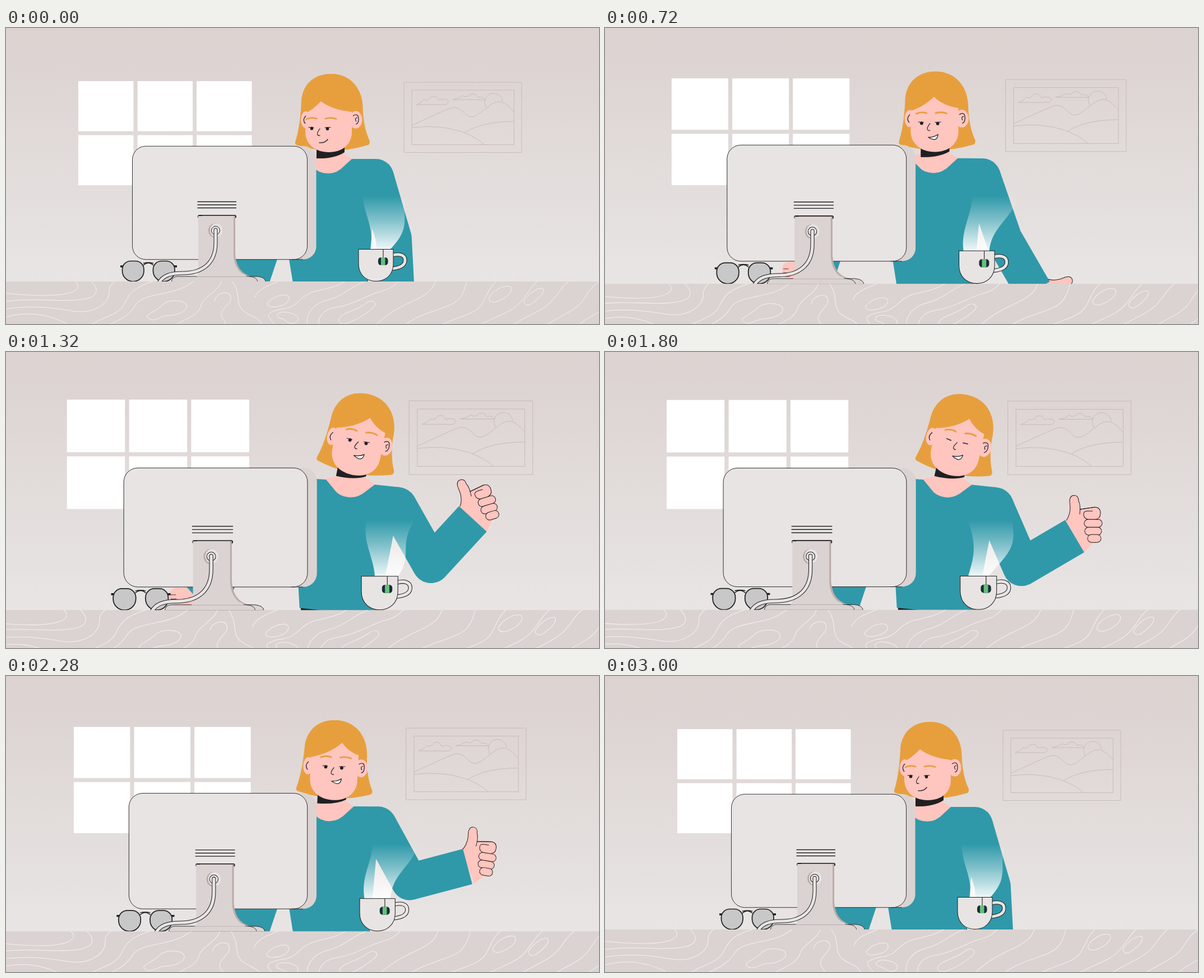
An HTML page with a canvas for the animation above (3060 ms loop, 1058x529 px).

```html
<!DOCTYPE html>
<html lang="en">
<head>
<meta charset="utf-8">
<title>Thumbs up at the desk</title>
<style>
html, body { margin: 0; height: 100%; overflow: hidden; background: #dcd3d1; }
canvas { display: block; width: 1058px; height: 529px; }
</style>
</head>
<body>
<canvas id="stage" width="1058" height="529"></canvas>
<script>
const ctx = document.getElementById('stage').getContext('2d');
const LOOP = 3060, STEP = 60, DEG = Math.PI / 180;
const INK = '#202022', HAIR = '#e79f3e', SKIN = '#ffc5bf', TEAL = '#2f99a9',
      PALE = '#e8e4e3', SAND = '#dbd3d1', SHADE = '#bbaca8';

// pose tracks, one value per time in KEYS
const KEYS = [0, 480, 960, 1320, 1800, 2280, 2900, 3060];
const TRACKS = {
  headX:  [0, 7.1, 10.2, 35.5, 34.8, 1.8, 0, 0],
  headY:  [0, .6, 1.5, 1.6, 2.3, 1.2, 0, 0],
  tilt:   [0, 0, 0, 11, 12, 3, 0, 0],
  turn:   [0, 0, 1, 1, 1, 1, 0, 0],
  bodyX:  [0, 7, 10, 12, 9, .5, 0, 0],
  lean:   [0, 0, 1.1, 6, 6, .3, 0, 0],
  upper:  [16.2, 16.2, 23.7, 29.5, 23.4, 28.7, 16.2, 16.2],
  fore:   [87, 87, 13.8, -47.4, -30.4, -14.9, 87, 87],
  hand:   [90, 90, 45, -17, 0, 9.5, 90, 90],
  sleeve: [484, 441, 413, 414, 469, 485, 484, 484],
  typing: [370, 350, 300, 303, 352, 368, 370, 370]
};

const slope = (v, i) => (v[i + 1] - v[i]) / (KEYS[i + 1] - KEYS[i]);
function tangent(v, i) {
  if (i === 0 || i === v.length - 1) return 0;
  const a = slope(v, i - 1), b = slope(v, i);
  return a * b > 0 ? 2 * a * b / (a + b) : 0;
}
// monotone cubic through the keys
function sample(v, t) {
  let i = 0;
  while (i < KEYS.length - 2 && t >= KEYS[i + 1]) i++;
  const h = KEYS[i + 1] - KEYS[i], u = (t - KEYS[i]) / h, w = 1 - u;
  return v[i] * (1 + 2 * u) * w * w + v[i + 1] * u * u * (3 - 2 * u) +
    h * u * w * (w * tangent(v, i) - u * tangent(v, i + 1));
}
const cubic = u => u < .5 ? 4 * u ** 3 : 1 - 4 * (1 - u) ** 3;
const zoom = t => 1 + .0508 * (t < 1410 ? cubic(t / 1440) : 1 - cubic((t - 1380) / 1680));

function draw(d, fill, line, width = 1) {
  const p = new Path2D(d);
  if (fill) { ctx.fillStyle = fill; ctx.fill(p); }
  if (line) { ctx.strokeStyle = line; ctx.lineWidth = width; ctx.stroke(p); }
}
function shape(build, fill, line, width = 1) {
  ctx.beginPath();
  build();
  if (fill) { ctx.fillStyle = fill; ctx.fill(); }
  if (line) { ctx.strokeStyle = line; ctx.lineWidth = width; ctx.stroke(); }
}
const oval = (x, y, rx, ry, ...style) => shape(() => ctx.ellipse(x, y, rx, ry, 0, 0, 7), ...style);
const box = (x, y, w, h, r, ...style) => shape(() => ctx.roundRect(x, y, w, h, r), ...style);
function group(fn, dx = 0, dy = 0, angle = 0, px = 0, py = 0, scale = 1) {
  ctx.save();
  ctx.translate(px + dx, py + dy);
  ctx.rotate(angle * DEG);
  ctx.scale(scale, scale);
  ctx.translate(-px, -py);
  fn();
  ctx.restore();
}

function room() {
  const g = ctx.createLinearGradient(0, 0, 0, 453);
  g.addColorStop(0, '#dcd3d1');
  g.addColorStop(.2, '#ddd5d3');
  g.addColorStop(1, '#e8e5e4');
  ctx.fillStyle = g;
  ctx.fillRect(-20, -20, 1100, 480);
  ctx.fillStyle = '#fff';
  for (const x of [129, 234.6, 340])
    for (const y of [95, 191.5]) ctx.fillRect(x, y, 98.5, 89.5);

  const line = '#c2b6b3';
  draw('M710 97H920V222.5H710Z M724 111H906.500V208.500H724Z', null, line, .8);
  draw(`M724 174C748 163 775 150 791 144C805 138 813 147 821 155C835 166 846 150 860 141C880 124 892 133 906 150
    M724 178Q772 172 812 185Q838 194 853 208.500 M818 187Q850 167 906 167
    M857 142A16 16 0 1 1 886 131
    M732 137H785Q793 132 786 128Q779 126 772 129Q769 119 759 123Q753 131 746 128Q741 134 732 137
    M797 128H855Q849 121 842 124Q837 115 828 119Q822 126 815 121Q806 127 797 128`, null, line, .8);
}

function leftArm(p) {
  const x = p.typing, r = p.sleeve;
  box(x, 415, 50, 29, 12, SKIN);
  draw(`M${x + 2} 427H${x + 11} M${x + 2} 434H${x + 12} M${x + 4} 440H${x + 13}`, null, INK, .8);
  draw(`M${x + 26} 410H${r + 1}L${r - 14} 455H${x + 70}L${x + 43} 429Z`, TEAL);
}

function torso() {
  draw('M513 450H646V480H518Z', INK);
  draw('M534 232L554 226H604L617 234L604 264H549Z', SKIN);
  draw(`M534 234L490 236C465 240 470 300 480 340L505 413L512 456H645L657 320L660 234H617L604 246
    Q591 260 575 260Q558 260 549 249Z`, TEAL);
}

function thumb() {
  draw(`M-17 -29Q-8 -38 -8 -52L-9 -62Q-9 -73 -1 -73Q7 -73 7 -63Q11 -56 9 -48L36 -52Q46 -52 46 -41
    L48 -20L46 8Q40 14 31 13L17 29Z`, SKIN);
  draw('M-15 -28Q-8 -38 -8 -52L-9 -62Q-9 -73 -1 -73Q7 -73 7 -63Q11 -56 9 -39M9 -48L36 -52', null, INK);
  draw('M16 -38Q15 -45 23 -45H32M9 -48L36 -52Q46 -52 46 -41Q46 -31 36 -30H24Q17 -31 16 -38', null, INK);
  for (const [x, y, w] of [[17, -30, 32], [18, -16, 30], [23, -3, 24]])
    box(x, y, w, 14, 7, SKIN, INK);
}

function rightArm(p) {
  const lean = p.lean * DEG, c = Math.cos(lean), s = Math.sin(lean);
  const sx = 575 + p.bodyX + 85 * c + 187 * s, sy = 453 - 187 * c + 85 * s;
  const ex = sx + 114 * Math.sin(p.upper * DEG), ey = sy + 114 * Math.cos(p.upper * DEG);
  const wx = ex + 105 * Math.cos(p.fore * DEG), wy = ey + 105 * Math.sin(p.fore * DEG);
  group(thumb, wx, wy, p.hand, 0, 0, .955);
  ctx.lineJoin = 'round';
  draw(`M${sx} ${sy}L${ex} ${ey}L${wx} ${wy}`, null, TEAL, 64);
  oval(sx, sy, 32, 32, TEAL);
}

function head(p, t) {
  const k = p.turn, top = 'C530 98 552 82 580 82C612 82 633 105 636 135';
  draw(`M516 204C524 180 526 150 527 130${top}C637 165 641 185 649 202Q650 209 643 210
    Q582 228 521 210Q515 209 516 204`, HAIR);
  draw('M554 195H604V238H554Z', SKIN);
  draw(`M554 205H604V${222 - 2 * k}Q586 ${234 - 4 * k} 554 ${233 - 4 * k}Z`, INK);
  group(() => draw('M534 140L558 108H598L617 140V186C617 208 600 222 576 222C552 222 534 208 534 185Z', SKIN), 5 * k);
  const ax = 562 + 30 * k, ay = 131 - 10 * k;
  draw(`M527 130${top}L637 ${151 - 7 * k}Q${ax + 24 - 7 * k} ${150 - 8 * k} ${ax} ${ay}
    Q${ax - 14 - 10 * k} ${ay + 15 + 8 * k} 530 ${155 - 5 * k}Z`, HAIR);

  oval(535, 164, 9, 15, SKIN);
  oval(624 + 3.5 * k, 164, 11.5, 15.5, SKIN);
  draw('M535 157Q528 164 534 171', null, INK, 1.2);
  group(() => draw('M619 157Q629 151 629 163Q629 171 624 172M627 160Q621 161 625 167', null, INK, 1.2), 4 * k);

  group(() => {
    ctx.lineCap = 'round';
    draw('M536 163Q545 159 554 162M570 162Q580 159 589 162.500', null, HAIR, 2.8);
    if (Math.abs(t - 480) <= 60 || Math.abs(t - 1800) <= 60) {
      draw('M541 177L549 178.500M570 178.500H578', null, INK, 1.4);
    } else {
      oval(545.5, 179.5, 2.8, 2.9, INK);
      oval(573.5, 180, 2.8, 2.9, INK);
      draw('M540 177.500L549 178M569 178L579 177.500', null, INK, 1);
    }
    draw('M560 180Q554 188 556 191Q558 193 560 192', null, INK, 1.2);
    if (k < .5) draw('M559 205Q569 206 574 199', null, INK, 1.3);
    else draw('M557 204Q567 204 574 199Q573 208 567 208Q561 207 557 204Z', '#fff', INK, 1.2);
    ctx.lineCap = 'butt';
  }, 20 * k, -15 * k);
}

function glasses() {
  for (const x of [207.5, 262.5])
    box(x, 416.5, 38.5, 36.5, [15, 15, 19, 19], '#c9c8c8', INK, 1.7);
  draw('M245 424Q254 416 263 424M245 420.500Q254 418 263 420.500', null, INK, 1.4);
  draw('M204 426L209 426M300 426H305', null, INK, 3.5);
}

function monitor() {
  box(480, 211, 73.5, 202.5, 23, SAND);
  box(225.5, 211.2, 312, 202.5, 24, PALE, INK, .9);
  draw('M510 413.700H530', null, INK, .8);
  draw('M341.500 310.500H411M341.500 316H411M341.500 321.500H411', null, INK, 1.3);
  box(342, 334, 69, 6, 3, INK);
  draw('M350 335.500H409V402C410 430 424 443 446 445H350Z', SHADE);
  draw('M343 336H406V404C407 430 420 443 440 446H343Z', SAND);
  draw('M295 453.500Q297 444 306 444H448Q462 445 463.500 453.500Z', SAND, INK, .9);
  draw('M434 444Q447 445 449 453', null, INK, .8);
  draw('M344 440H425L430 444.500H340Z', SAND);
  oval(372.5, 362, 11.5, 12.5, SHADE);
  oval(375, 361.5, 11, 12, PALE);
  oval(374, 361.8, 7.6, 7.6, PALE, INK);
  const cable = 'M374 361V384C374 424 346 438 316 438C292 438 280 443 273 455';
  ctx.lineCap = 'round';
  draw(cable, null, INK, 7);
  draw(cable, null, PALE, 5);
  ctx.lineCap = 'butt';
}

function desk() {
  ctx.fillStyle = SAND;
  ctx.fillRect(-20, 453, 1100, 110);
  draw(`M-10 473C35 478 95 482 120 471Q135 463 124 453 M-10 490C50 480 100 492 142 484C170 478 162 462 152 453
    M-10 504C40 494 85 500 120 506C160 512 186 490 184 470Q184 460 194 453
    M-10 519C40 504 74 512 108 528 M138 540C170 514 200 516 212 492C222 470 232 463 262 453
    M160 540C205 522 220 514 232 494C246 474 290 478 320 462L334 453
    M252 514C262 506 270 504 280 494C292 484 318 486 322 495C326 507 302 514 288 514C276 515 268 524 258 521Q250 518 252 514
    M290 540C310 520 340 520 348 496C352 480 380 470 384 453
    M372 488C374 474 392 470 399 476C408 490 386 498 384 512Q384 518 390 524L396 540
    M404 453C420 476 408 492 424 506C440 518 452 514 462 540
    M466 493C472 484 486 476 500 477C512 482 502 494 488 497Q468 502 466 493
    M484 512C490 505 505 508 513 511C525 516 524 526 512 528C500 528 498 520 490 519Q482 517 484 512
    M444 482C450 465 470 460 486 453 M486 540C470 514 455 512 488 503C524 500 520 480 550 471C580 464 590 462 604 453
    M540 540C530 510 550 492 574 486C600 480 612 464 640 453
    M560 540C552 518 566 502 590 499C620 494 640 480 664 472C690 465 692 460 700 453
    M594 520C600 508 624 506 642 492C650 485 664 488 657 498C644 510 620 526 602 529Q592 527 594 520
    M650 540C680 510 700 500 730 486C752 476 762 466 766 453
    M700 540C730 512 764 508 794 494C812 486 818 470 822 453
    M760 540C800 514 836 516 850 492C860 474 862 464 874 453
    M862 482C868 470 888 458 900 462C908 472 888 486 872 490Q860 490 862 482
    M830 540C870 514 898 512 918 490C932 474 936 462 948 453
    M890 540C930 512 950 510 972 490C988 474 990 462 1004 453
    M924 489C930 476 950 462 958 466C962 474 948 486 936 494Q926 498 924 489
    M950 540C990 512 1014 508 1030 486C1040 470 1046 462 1058 453
    M1010 540C1040 514 1060 508 1080 494`, null, 'rgba(255,255,255,.65)', 1);
}

// two wavy edges whose crests climb twice per loop
function steam(t) {
  const p = 2 * t / LOOP;
  const wave = u => 8 * Math.cos(2 * Math.PI * (u + p));
  const left = y => 644 + wave((y - 378) / 170);
  const right = y => 722 - 39 * ((y - 300) / 98) ** 1.3 + wave((y - 305) / 125 - .5);
  const g = ctx.createLinearGradient(0, 300, 0, 398);
  g.addColorStop(0, 'rgba(255,255,255,0)');
  g.addColorStop(.45, 'rgba(255,255,255,.4)');
  g.addColorStop(1, 'rgba(255,255,255,.95)');
  shape(() => {
    for (let y = 300; y <= 398; y += 2) ctx.lineTo(left(y), y);
    for (let y = 398; y >= 300; y -= 2) ctx.lineTo(right(y), y);
  }, g);
}

function mug() {
  const handle = 'M690 406C701 403 712 405 712 415C712 426 700 429 689 430';
  draw(handle, null, INK, 7);
  draw(handle, null, PALE, 5);
  draw('M629 395.500H691V421C691 441 677 452.500 660 452.500C643 452.500 629 441 629 421Z', PALE, INK);
  draw('M673 396V411', null, INK, 1.1);
  box(664, 410, 17.5, 14, 5, '#1d2a38');
  ctx.fillStyle = '#62c27a';
  ctx.fillRect(669, 410, 7.5, 14);
}

function render(t) {
  const p = {};
  for (const name in TRACKS) p[name] = sample(TRACKS[name], t);
  group(() => {
    room();
    leftArm(p);
    group(torso, p.bodyX, 0, p.lean, 575, 453);
    rightArm(p);
    group(() => head(p, t), p.headX, p.headY, p.tilt, 582.5, 208);
    glasses();
    monitor();
    steam(t);
    desk();
    mug();
  }, 0, 0, 0, 529, 290, zoom(t));
}

const start = performance.now();
function frame() {
  const t = (performance.now() - start) % LOOP;
  render(Math.floor(t / STEP) * STEP);
  requestAnimationFrame(frame);
}
frame();
</script>
</body>
</html>
```
